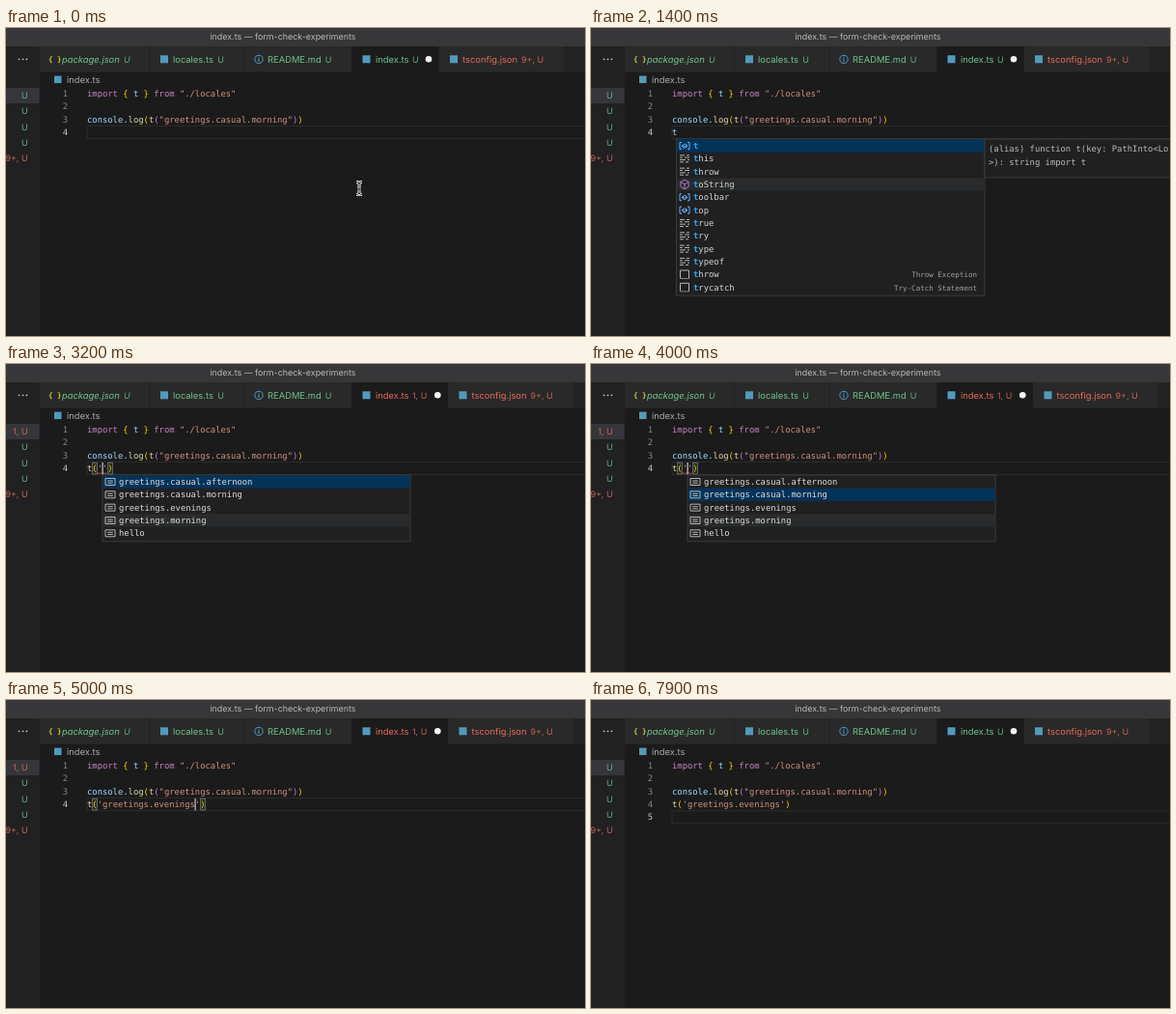
An HTML page that plays this animation: 600x319 px, repeating every 8000 ms.

```html
<!DOCTYPE html>
<html lang="en">
<head>
<meta charset="utf-8">
<title>Editor autocomplete</title>
<style>
  html, body { margin: 0; width: 100%; height: 100%; overflow: hidden; background: #1b1b1c; }
  svg { display: block; width: 600px; height: 319px; }
  text { white-space: pre; text-rendering: geometricPrecision; }
  .ui { font: 9.4px Inter, "Open Sans", sans-serif; }
  .mono { font: 8.86px "DejaVu Sans Mono", "Liberation Mono", monospace; }
  .note { font-size: 7.53px; }
  .tag { font-size: 8.9px; opacity: .85; }
  .bold { font-weight: bold; }
  .italic { font-style: italic; }
</style>
</head>
<body>
<svg id="stage" viewBox="0 0 600 319" xmlns="http://www.w3.org/2000/svg"></svg>
<script>
const LOOP = 8000, CH = 5.334, ROW = 13.33, LEFT = 84;
const BLUE = '#519aba', GREEN = '#6fc28c', RED = '#e06c5b', LIGHT = '#d4d4d4';
const KEY = '#c586c0', NAME = '#9cdcfe', FUNC = '#dcdcaa', STR = '#ce9178';
const GOLD = '#ffd700', PINK = '#da70d6';
const ERROR_ON = 2100, ERROR_OFF = 5200;

const esc = s => s.replace(/&/g, '&amp;').replace(/</g, '&lt;');
const rect = (x, y, w, h, fill, more = '') =>
  `<rect x="${x}" y="${y}" width="${w}" height="${h}" fill="${fill}" ${more}/>`;
const text = (x, y, s, fill, cls = 'ui', anchor = 'start') =>
  `<text x="${x}" y="${y}" class="${cls}" fill="${fill}" text-anchor="${anchor}">${esc(s)}</text>`;
const path = (d, stroke, w = 0.9) =>
  `<path d="${d}" fill="none" stroke="${stroke}" stroke-width="${w}"/>`;
// Shown only during the listed from-to spans
const during = (spans, body) => `<g data-on="${spans}">${body}</g>`;
const base = line => 71 + ROW * (line - 1);
const col = n => LEFT + CH * n;

// Coloured code: alternating colour, text
function code(x, y, ...parts) {
  let out = '';
  for (let i = 0; i < parts.length; i += 2)
    out += `<tspan fill="${parts[i]}">${esc(parts[i + 1])}</tspan>`;
  return `<text x="${x}" y="${y}" class="mono">${out}</text>`;
}

const square = (x, y, size = 8) => rect(x, y, size, size, BLUE);
const dot = x => `<circle cx="${x}" cy="32.3" r="3.3" fill="#f4f4f4"/>`;

function chrome() {
  let out = rect(0, 0, 600, 319, '#1b1b1c') + rect(0, 19, 35, 300, '#212122')
    + rect(0, 0, 600, 19, '#373638') + rect(35, 19, 565, 26.5, '#232324')
    + text(287, 12.4, 'index.ts — form-check-experiments', '#cfcfcf', 'ui tag', 'middle');
  for (const x of [13.5, 17.5, 21.5]) out += `<circle cx="${x}" cy="32.3" r=".9" fill="#c5c5c5"/>`;
  out += rect(0, 62, 34.5, 16, '#36363a');
  for (const y of [89.4, 105.6, 121.8]) out += text(22.5, y, 'U', GREEN, 'ui tag', 'end');
  return out + text(22.5, 138.3, '9+, U', RED, 'ui tag', 'end');
}

function tabs() {
  const bg = '#292929', y = 35.8;
  const ok = `0-${ERROR_ON} ${ERROR_OFF}-${LOOP}`, bad = `${ERROR_ON}-${ERROR_OFF}`;
  let out = rect(35, 19, 113.5, 26.5, bg) + rect(149.3, 19, 97.5, 26.5, bg)
    + rect(247.5, 19, 110.5, 26.5, bg) + rect(358.5, 19, 90, 26.5, '#1b1b1c');
  out += text(44, 35.4, '{ }', '#cbcb41', 'mono note bold')
    + text(58, y, 'package.json', GREEN, 'ui italic') + text(122, y, 'U', GREEN, 'ui tag italic');
  out += square(160, 28.3) + text(173, y, 'locales.ts', GREEN) + text(219.3, y, 'U', GREEN, 'ui tag');
  out += `<circle cx="262" cy="32.4" r="4.1" fill="none" stroke="${BLUE}"/>`
    + path('M262 31.6V35M262 29.8V30.8', BLUE, 1.1)
    + text(271, y, 'README.md', GREEN) + text(330.8, y, 'U', GREEN, 'ui tag');
  out += `<g id="last">${rect(448.8, 19, 129.4, 26.5, bg)}${square(460, 28.3)}`
    + text(473, y, 'tsconfig.json', RED) + text(534, y, '9+, U', RED, 'ui tag') + '</g>';
  out += during(ok, text(383, y, 'index.ts', GREEN) + text(421, y, 'U', GREEN, 'ui tag')
    + dot(438) + text(22.5, 73.3, 'U', GREEN, 'ui tag', 'end'));
  out += during(bad, rect(448.5, 19, 9.5, 26.5, '#1b1b1c') + text(383, y, 'index.ts', RED)
    + text(421, y, '1, U', RED, 'ui tag') + dot(447.3)
    + text(22.5, 73.3, '1, U', RED, 'ui tag', 'end'));
  return out + square(369.5, 28.3) + square(50, 49.6, 7.5) + text(63, 56.8, 'index.ts', '#a9a9a9');
}

function squiggle(x, end, y) {
  let d = `M${x} ${y}`;
  for (let i = 1; x + i * 1.4 <= end; i++) d += `L${x + i * 1.4} ${y - (i % 2) * 1.5}`;
  return path(d, '#f14c4c', 0.8);
}

function editor() {
  const number = (n, fill) => text(64, base(n), String(n), fill, 'mono', 'end');
  const current = n => path(`M600 ${base(n) - 9.5}H84V${base(n) + 3.5}H600`, '#2c2c2c', 1)
    + number(n, '#c6c6c6');
  let out = number(1, '#858585') + number(2, '#858585') + number(3, '#858585');
  out += during('0-7000', current(4)) + during('7000-8000', number(4, '#858585') + current(5));
  out += code(LEFT, base(1), KEY, 'import ', GOLD, '{ ', NAME, 't', GOLD, ' } ',
    KEY, 'from ', STR, '"./locales"');
  out += code(LEFT, base(3), NAME, 'console', LIGHT, '.', FUNC, 'log', GOLD, '(', FUNC, 't',
    PINK, '(', STR, '"greetings.casual.morning"', PINK, ')', GOLD, ')');

  const y = base(4);
  const match = n => rect(col(n) + 0.4, y - 8.8, CH - 0.8, 11.8, '#1a261a', 'stroke="#858585" stroke-width=".8"');
  const call = (arg, spans) => during(spans,
    code(LEFT, y, FUNC, 't', GOLD, '(', STR, arg, GOLD, ')'));
  out += during('1500-7000', match(1)) + during('1500-2900', match(2))
    + during('2900-4600', match(4)) + during('4600-7000', match(22));
  out += during('900-1500', code(LEFT, y, NAME, 't')) + call('', '1500-2900')
    + call("''", '2900-4600') + call("'greetings.evenings'", '4600-8000');
  out += during('2000-2900', squiggle(col(0), col(3), y + 3))
    + during('3200-4600', squiggle(col(2), col(4), y + 3));

  const caret = (n, line, spans) => during(spans, rect(col(n) - 0.5, base(line) - 9, 1.2, 12.4, '#c8c8c8'));
  return out + caret(0, 4, '300-800') + caret(1, 4, '900-1400')
    + caret(2, 4, '1500-1900 2400-2900') + caret(3, 4, '2900-3400 3900-4400')
    + caret(21, 4, '4600-5100') + caret(23, 4, '5600-6100 6600-7000') + caret(0, 5, '7000-7500');
}

// Icons are centred on the origin
const icons = {
  variable: path('M-3-3.5H-5V3.5H-3M3-3.5H5V3.5H3M-2.4-.3L.2-2L2.4-.6V1L-.2 2.4L-2.4 1ZM-2.4-.3L-.2.8L2.4-.6', '#75beff'),
  keyword: path('M-5-3.5H0M2-3.5H5M-5-1.2H-2M0-1.2H5M-5 1.2H1M3 1.2H5M-5 3.5H-1M1 3.5H4', '#c5c5c5'),
  method: path('M0-4.8L4.2-2.5V2.5L0 4.8L-4.2 2.5V-2.5ZM-4.2-2.5L0-.2L4.2-2.5M0-.2V4.8', '#b180d7'),
  snippet: path('M-4.5 4V-4.3H4.5V4', '#c5c5c5') + path('M-4.5 4.2H4.5', '#c5c5c5', 0.6),
  constant: path('M-5-3.5H5V3.5H-5ZM-2.8-1H2.8M-2.8 1.2H2.8', '#c5c5c5')
};

const frame = (x, y, w, h) => rect(x, y, w, h, '#202021', 'stroke="#414141" stroke-width=".8"');
const rowTop = i => 115.3 + ROW * i;
const bar = (x, w, i, fill) => rect(x + 0.5, rowTop(i), w - 1, ROW, fill);
const icon = (kind, x, i) => `<g transform="translate(${x} ${rowTop(i) + 6.7})">${icons[kind]}</g>`;

function wordPopup() {
  const kinds = { v: 'variable', k: 'keyword', m: 'method', s: 'snippet' };
  const items = ('v:t k:this k:throw m:toString v:toolbar v:top k:true k:try k:type k:typeof '
    + 's:throw s:trycatch').split(' ');
  const notes = { 10: 'Throw Exception', 11: 'Try-Catch Statement' };
  let out = frame(88.5, 115, 319.5, ROW * items.length + 2.2)
    + bar(88.5, 319.5, 0, '#04335a') + bar(88.5, 319.5, 3, '#292b2c');
  items.forEach((item, i) => {
    const [kind, word] = item.split(':'), y = rowTop(i) + 9.8;
    out += icon(kinds[kind], 97, i) + text(106, y, 't', '#2aa4f4', 'mono bold')
      + text(106 + CH, y, word.slice(1), LIGHT, 'mono');
    if (notes[i]) out += text(400, y, notes[i], '#a0a0a0', 'mono note', 'end');
  });
  const info = frame(408, 115, 200, 40)
    + text(412, 128.3, '(alias) function t(key: PathInto<Lo', '#b8b8b8', 'mono')
    + text(412, 141.7, '>): string import t', '#b8b8b8', 'mono');
  return during('1000-1500', out) + during('1100-1500', info);
}

function keyPopup() {
  const items = ['greetings.casual.afternoon', 'greetings.casual.morning',
    'greetings.evenings', 'greetings.morning', 'hello'];
  const x = 100, w = 319, spans = ['3100-3700', '3700-4200', '4200-4600'];
  let out = frame(x, 115, w, ROW * items.length + 2.2) + bar(x, w, 3, '#292b2c');
  spans.forEach((span, i) => { out += during(span, bar(x, w, i, '#04335a')); });
  items.forEach((item, i) => {
    out += icon('constant', 108, i) + text(117, rowTop(i) + 9.8, item, '#dcdcdc', 'mono');
  });
  return during('3100-4600', out);
}

function pointer() {
  const beam = 'M-3-6.5Q0-6.5 0-4.5Q0-6.5 3-6.5M0-4.5V4.5M-3 6.5Q0 6.5 0 4.5Q0 6.5 3 6.5M-1.5 1H1.5';
  return during('0-100 5700-7000', `<g id="mouse">${path(beam, '#f0f0f0', 3)}${path(beam, '#222', 1)}</g>`);
}

const stage = document.getElementById('stage');
stage.innerHTML = chrome() + tabs() + editor() + wordPopup() + keyPopup() + pointer();

const timed = [...stage.querySelectorAll('[data-on]')].map(el => ({
  el, spans: el.dataset.on.split(' ').map(s => s.split('-').map(Number))
}));
const mouse = document.getElementById('mouse'), last = document.getElementById('last');
const ease = p => p * p * (3 - 2 * p);
const ramp = (t, a, b) => ease(Math.min(1, Math.max(0, (t - a) / (b - a))));

function draw(now) {
  const t = now % LOOP;
  for (const { el, spans } of timed)
    el.style.display = spans.some(([a, b]) => t >= a && t < b) ? '' : 'none';
  const go = ramp(t, 5700, 6000), back = ramp(t, 6000, 6200);
  mouse.setAttribute('transform', `translate(${366 + 18 * go - back} ${166 + 20 * go - 2.5 * back})`);
  last.setAttribute('transform', `translate(${t >= ERROR_ON && t < ERROR_OFF ? 9.5 : 0} 0)`);
}

const start = performance.now();
function tick() {
  draw(performance.now() - start);
  requestAnimationFrame(tick);
}
tick();
</script>
</body>
</html>
```
